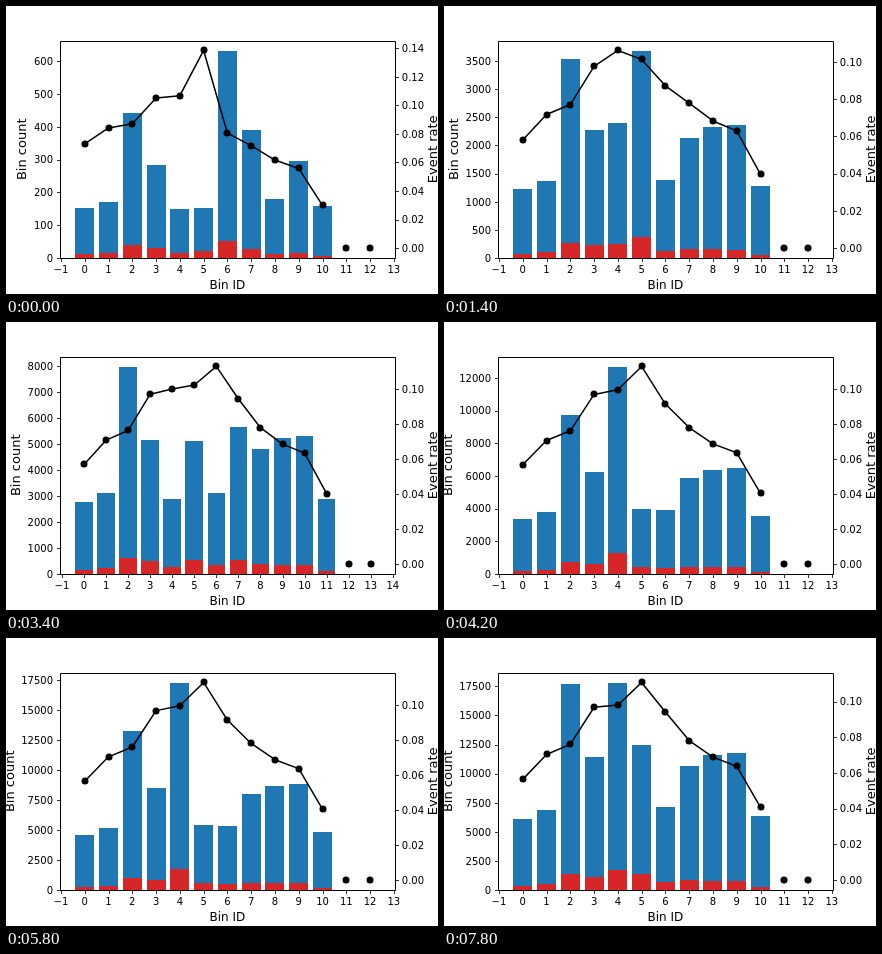
An HTML page for the animation above (8 s loop, 432 by 288 pixels).

```html
<!DOCTYPE html>
<html lang="en">
<head>
<meta charset="utf-8">
<title>Bin counts and event rate</title>
<style>
  html, body { margin: 0; width: 100%; height: 100%; overflow: hidden; background: #fff; }
  svg { display: block; width: 432px; height: 288px; font: 10px "DejaVu Sans", sans-serif; }
</style>
</head>
<body>
<svg id="chart" viewBox="0 0 432 288"></svg>
<script>
const STEP = 200, STEPS = 40;
const LEFT = 54, RIGHT = 388.8, TOP = 34.56, BOTTOM = 252;
const WIDTH = RIGHT - LEFT, HEIGHT = BOTTOM - TOP;
const chart = document.getElementById('chart');

// Bins are [records per batch, events per 10000 records].
// The outer bins are stable; the ones around the peak are regrouped in each phase.
const head = [[153, 560], [172, 700], [442, 757], [285, 966]];
const tail = [[267, 782], [290, 690], [295, 640], [160, 410]];
const phases = [
  { from: 0, keep: 2, middle: [[149, 1068], [152, 1385], [632, 806], [390, 718], [180, 617]] },
  { from: 3, keep: 4, middle: [[300, 1062], [460, 1014], [174, 872]] },
  { from: 15, keep: 4, middle: [[160, 1000], [284, 1023], [173, 1129], [314, 943]] },
  { from: 19, keep: 4, middle: [[576, 997], [181, 1130], [178, 915]] },
  { from: 34, keep: 4, middle: [[445, 980], [312, 1107], [179, 941]] }
];

// Each step adds one batch; the early tilt of the outer rates averages out.
function dataAt(step) {
  const batches = step + 1;
  const { keep, middle } = phases.filter(p => p.from <= step).pop();
  const bins = [...head, ...middle, ...tail.slice(-keep)];
  const tilt = i => middle.includes(bins[i]) ? 0 : (170 - 28 * i) / batches;
  return {
    counts: bins.map(([size]) => size * batches),
    rates: bins.map(([, rate], i) => (rate + tilt(i)) / 1e4)
  };
}

// Smallest round step that splits the range into at most nine intervals.
function tickStep(range) {
  const raw = range / 9, mag = 10 ** Math.floor(Math.log10(raw));
  return [1, 2, 2.5, 5, 10].find(m => m * mag >= raw) * mag;
}

const px = v => Math.floor(v + 0.5);
const text = (x, y, s, anchor, extra = '') =>
  `<text x="${x}" y="${px(y)}" text-anchor="${anchor}" ${extra}>${s}</text>`;
const upright = (x, s) =>
  text(0, 0, s, 'middle', `font-size="13" transform="translate(${x} 143.3) rotate(-90)"`);
const rect = (x0, x1, y0, y1, fill) =>
  `<rect x="${px(x0)}" y="${px(y0)}" width="${px(x1) - px(x0)}" height="${px(y1) - px(y0)}" fill="${fill}"/>`;

function draw(step) {
  const { counts, rates } = dataAt(step);
  const n = counts.length, slots = n + 2;
  const pad = 0.4 + 0.05 * (slots - 0.2);
  const unit = WIDTH / (slots - 1 + 2 * pad);
  const maxCount = Math.max(...counts) * 1.05, maxRate = Math.max(...rates);
  const x = i => LEFT + (i + pad) * unit;
  const yCount = v => BOTTOM - v / maxCount * HEIGHT;
  const yRate = v => BOTTOM - (v / maxRate + 0.05) / 1.1 * HEIGHT;

  let bars = '', ticks = '', labels = '';
  counts.forEach((c, i) => {
    const x0 = x(i - 0.4), x1 = x(i + 0.4), split = yCount(c * rates[i]);
    bars += rect(x0, x1, yCount(c), split, '#1f77b4') + rect(x0, x1, split, BOTTOM, '#d62728');
  });

  for (let i = -1; i <= slots; i++) {
    ticks += `M${px(x(i)) + 0.5} 252.5v3.5`;
    labels += text(x(i), 267, i < 0 ? '\u2212' + -i : i, 'middle');
  }

  const dc = tickStep(maxCount);
  let digits = 1;
  for (let v = 0; v <= maxCount; v += dc) {
    const y = yCount(v), s = String(Math.round(v));
    digits = s.length;
    ticks += `M54.5 ${px(y) + 0.5}h-3.5`;
    labels += text(47, y + 3.8, s, 'end');
  }

  const dr = tickStep(maxRate * 1.1);
  for (let j = 0; j * dr <= maxRate * 1.05; j++) {
    const y = yRate(j * dr);
    ticks += `M389.5 ${px(y) + 0.5}h3.5`;
    labels += text(395.8, y + 3.8, (j * dr).toFixed(2), 'start');
  }

  const points = rates.concat(0, 0).map((r, i) => [x(i), yRate(r)]);
  const dots = points.map(([cx, cy]) => `<circle cx="${px(cx)}" cy="${px(cy)}" r="3.5"/>`).join('');

  chart.innerHTML = `<rect width="432" height="288" fill="#fff"/>
    <g shape-rendering="crispEdges">${bars}</g>
    <g fill="none" stroke="#000">
      <path d="M54.5 35.5H389.5V252.5H54.5Z"/>
      <path d="${ticks}" stroke-width="0.8"/>
      <polyline points="${points.slice(0, n).join(' ')}" stroke-width="1.5" stroke-linejoin="round"/>
    </g>
    ${dots}${labels}
    ${text(221.4, 283, 'Bin ID', 'middle', 'font-size="12"')}
    ${upright(39.3 - 6.36 * digits, 'Bin count')}
    ${upright(431.3, 'Event rate')}`;
}

let shown = -1;
const start = performance.now();
function tick() {
  const step = Math.floor((performance.now() - start) / STEP) % STEPS;
  if (step !== shown) draw(shown = step);
  requestAnimationFrame(tick);
}
tick();
</script>
</body>
</html>
```
